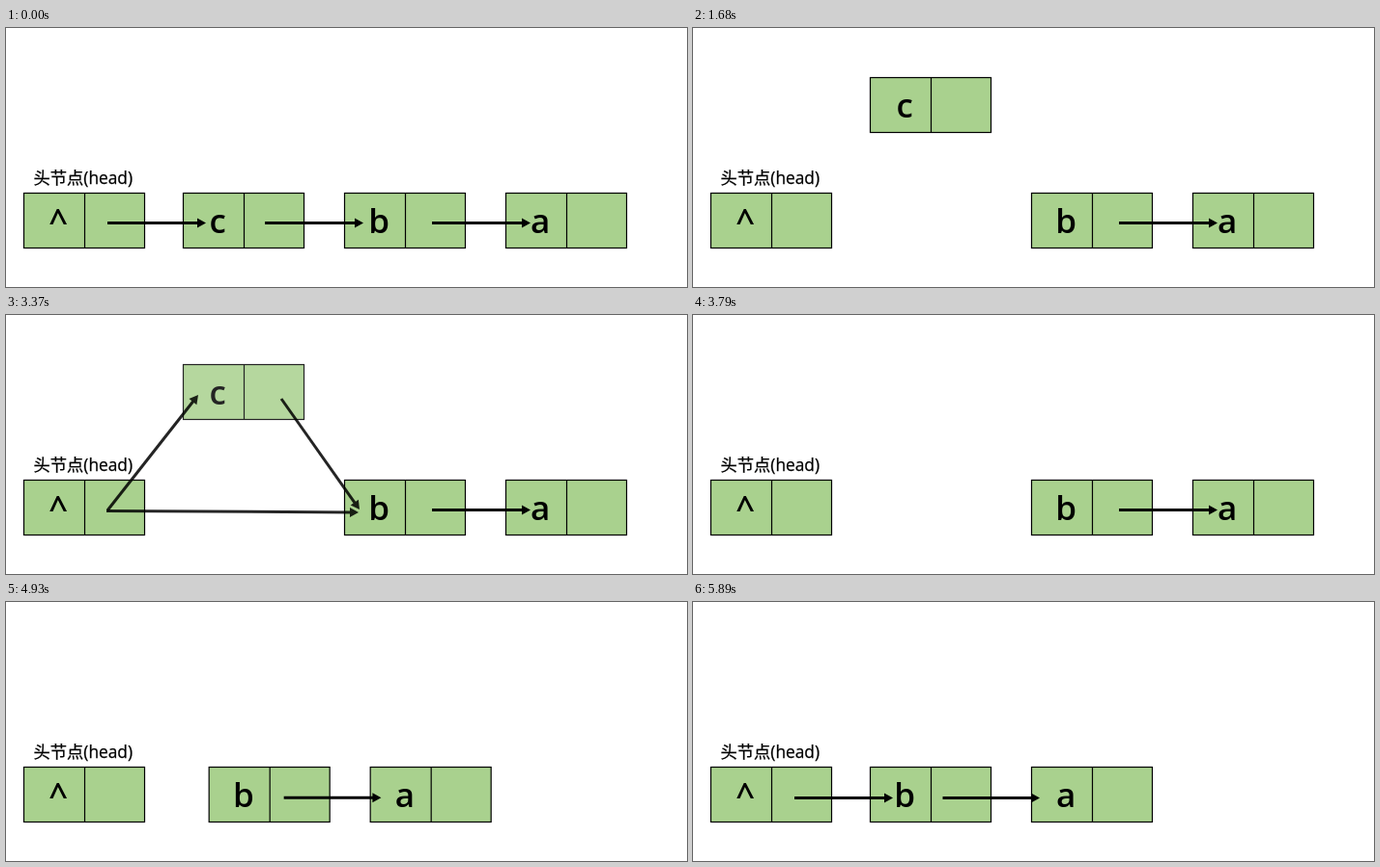
These frames come from a looping animation (705x269 px, 6010 ms). An HTML page:

```html
<!DOCTYPE html>
<html lang="zh">
<head>
<meta charset="utf-8">
<style>
html, body { margin: 0; width: 100%; height: 100%; overflow: hidden; background: #fff; }
svg { display: block; width: 100vw; height: 100vh; }
.cell { fill: #a9d18e; stroke: #000; stroke-width: 1.2; }
.key { font: 600 35px "Open Sans", "Noto Sans", sans-serif; text-anchor: middle; }
.label { font: 17.3px "Open Sans", "Noto Sans CJK SC", "Noto Sans CJK", sans-serif; stroke: #000; stroke-width: .25; }
.shaft { stroke: #000; stroke-width: 3; fill: none; }
</style>
</head>
<body>
<svg id="stage" viewBox="0 0 705 269"></svg>
<script>
const LOOP = 6010;
const stage = document.getElementById('stage');

function add(parent, tag, attrs, text) {
  const el = document.createElementNS('http://www.w3.org/2000/svg', tag);
  for (const k in attrs) el.setAttribute(k, attrs[k]);
  if (text) el.textContent = text;
  return parent.appendChild(el);
}

function makeNode(key) {
  const g = add(stage, 'g', {});
  add(g, 'rect', { class: 'cell', x: 0, y: 0, width: 125, height: 57 });
  add(g, 'path', { class: 'cell', d: 'M63 0V57' });
  add(g, 'text', { class: 'key', x: 35.7, y: 41.5 }, key);
  return g;
}

function makeArrow() {
  const g = add(stage, 'g', {});
  return { g, shaft: add(g, 'path', { class: 'shaft' }), tip: add(g, 'path', { d: 'M0 0L-9-5V5Z' }) };
}

const place = (node, x, y = 171.5) => node.setAttribute('transform', `translate(${x} ${y})`);
const fade = (el, a) => el.setAttribute('opacity', a);

// Draws the first part of an arrow; the tip shows once it is complete.
function draw(arrow, x1, y1, x2, y2, part = 1, alpha = 1) {
  const len = Math.hypot(x2 - x1, y2 - y1);
  const k = Math.min(part, 1 - 7 / len);
  const angle = Math.atan2(y2 - y1, x2 - x1) * 180 / Math.PI;
  arrow.shaft.setAttribute('d', `M${x1} ${y1}L${x1 + (x2 - x1) * k} ${y1 + (y2 - y1) * k}`);
  arrow.tip.setAttribute('transform', `translate(${x2} ${y2}) rotate(${angle})`);
  fade(arrow.tip, part >= 1 ? 1 : 0);
  fade(arrow.g, part > 0 ? alpha : 0);
}

const ramp = (t, from, to) => Math.min(1, Math.max(0, (t - from) / (to - from)));
const ease = p => (1 - Math.cos(Math.PI * p)) / 2;

const head = makeNode('^');
const nodeC = makeNode('c');
const nodeB = makeNode('b');
const nodeA = makeNode('a');
add(stage, 'text', { class: 'label', x: 28.5, y: 162 }, '头节点(head)');
const headC = makeArrow();
const cB = makeArrow();
const headB = makeArrow();
const bA = makeArrow();
place(head, 18.5);

function render(time) {
  const base = time < 1930 ? 0 : 10;
  const t = Math.floor((time - base) / 60) * 60 + base;
  const lift = ease(ramp(t, 165, 1645));
  const slide = ease(ramp(t, 3830, 5320));
  const gone = 1 - ramp(t, 3310, 3720);

  place(nodeC, 183.5, 171.5 - 120 * lift);
  fade(nodeC, gone);
  place(nodeB, 350.5 - 167 * slide);
  place(nodeA, 517.5 - 167 * slide);

  if (t < 1900) {
    const shown = t < 120 ? 1 : 0;
    draw(headC, 105, 202.5, 207, 202.5, shown);
    draw(cB, 268, 202.5, 370, 202.5, shown);
  } else {
    const grow = ramp(t, 1930, 2350);
    draw(headC, 105, 203, 199, 83, grow, gone);
    draw(cB, 285, 87, 366, 202, grow, gone);
  }

  if (t < 3830) draw(headB, 104, 203.5, 365, 205, ramp(t, 2300, 2710), gone);
  else draw(headB, 105, 203.5, 207, 203.5, ramp(t, 5330, 5770));

  draw(bA, 441 - 182.5 * slide, 202.5 + slide, 543 - 184 * slide, 202.5 + slide);
}

const start = performance.now();
function tick() {
  render((performance.now() - start) % LOOP);
  requestAnimationFrame(tick);
}
tick();
</script>
</body>
</html>
```
